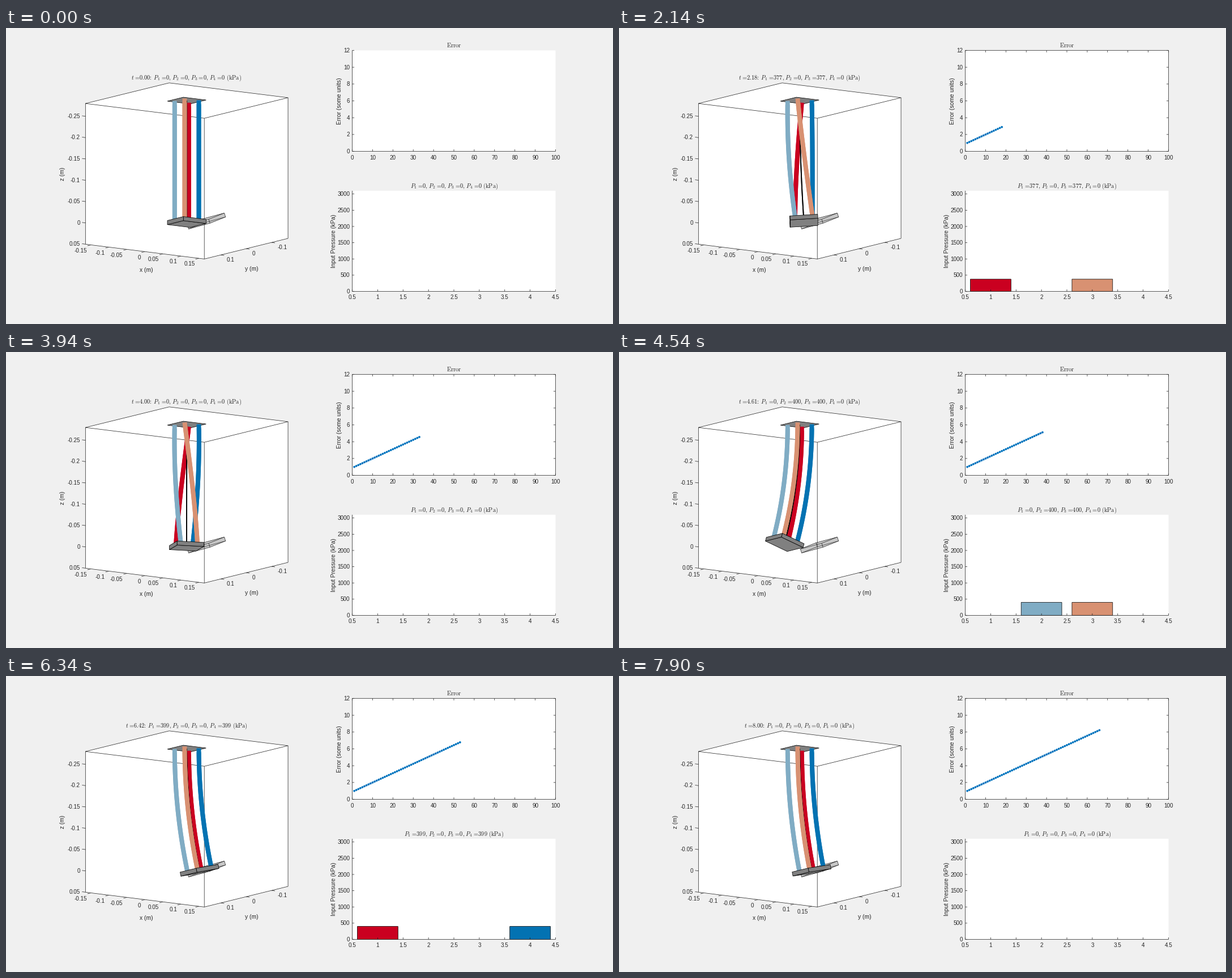
Recreate the animation shown at these times as a matplotlib script. Size 1072 by 522 pixels, loop 8000 ms.

```python
import numpy as np
import matplotlib.pyplot as plt
from matplotlib.animation import FuncAnimation
from matplotlib.collections import LineCollection, PolyCollection
from matplotlib.patches import Polygon, Rectangle

W, H, DPI = 1072, 522, 100
PX = 72 / DPI  # points per pixel
THIN = 0.75 * PX
INK = "#262626"
COLORS = ["#ca0020", "#80acc4", "#d89172", "#0372b2"]
STEPS, DURATION = 66, 8.0
TICK_SIZE, LABEL_SIZE, TITLE_SIZE = 9.9, 10.2, 10.45

plt.rcParams.update({"font.family": "Liberation Sans", "mathtext.fontset": "cm"})
fig = plt.figure(figsize=(W / DPI, H / DPI), dpi=DPI, facecolor="#f0f0f0")
ax = fig.add_axes([0, 0, 1, 1])
ax.set(xlim=(0, W), ylim=(H, 0))
ax.axis("off")


# ---- robot model -------------------------------------------------------

LENGTH, TUBE_R, PLATE_A, PLATE_H = 0.28, 0.0197, 0.0315, 0.0095
PAIRS = [(2, 3), (0, 2), (1, 2), (0, 3)]  # tubes inflated in each 2 s phase
SIGN_X = np.array([1, -1, -1, 1])
SIGN_Y = np.array([1, 1, -1, -1])
SIGN_TWIST = np.array([1, -1, 1, -1])
BEND, TWIST = 0.243, 1.69
# Bending is slow and swings past its goal, twisting is quick and well damped.
OMEGA = np.array([5.3, 5.3, 15])
ZETA = np.array([0.4, 0.4, 0.9])


def pressures(t):
    phase = min(int(t // 2), 3)
    edge = min(t - 2 * phase, 2 * phase + 2 - t)
    p = np.zeros(4)
    p[list(PAIRS[phase])] = 400 * (1 - np.exp(-edge / 0.064))
    return p


def simulate(substeps=40):
    """Damped response of (bend x, bend y, twist) to the pressures."""
    dt = DURATION / STEPS / substeps
    q, v = np.zeros(3), np.zeros(3)
    poses = [q.copy()]
    for i in range(1, STEPS * substeps + 1):
        p = pressures(i * dt) / 800
        goal = np.array([BEND * SIGN_X @ p, BEND * SIGN_Y @ p, TWIST * SIGN_TWIST @ p])
        v += dt * (OMEGA**2 * (goal - q) - 2 * ZETA * OMEGA * v)
        q += dt * v
        if i % substeps == 0:
            poses.append(q.copy())
    return poses


def section(pose, u):
    """Centre and rotation of the cross-section at fraction u of the length."""
    bx, by, twist = pose
    bend = max(np.hypot(bx, by), 1e-9)
    c, s = bx / bend, by / bend
    a = bend * u
    out = LENGTH * (1 - np.cos(a)) / bend
    centre = np.array([out * c, out * s, LENGTH * np.sin(a) / bend - LENGTH])
    k = np.array([[0, 0, c], [0, 0, s], [-c, -s, 0]])
    g = twist * u
    spin = np.array([[np.cos(g), -np.sin(g), 0], [np.sin(g), np.cos(g), 0], [0, 0, 1]])
    return centre, (np.eye(3) + np.sin(a) * k + (1 - np.cos(a)) * k @ k) @ spin


# ---- projection (orthographic, seen from slightly below) ---------------

VIEW = np.array([[636, -448, 0], [79, 110, 752]])
TOWARD = np.array([-0.567, -0.805, 0.174])
ORIGIN = np.array([319.2, 128 + 0.28 * 752])


def project(points):
    return np.asarray(points) @ VIEW.T + ORIGIN


CORNERS = [(-1, -1), (1, -1), (1, 1), (-1, 1)]
FACES = [(0, 1, 2, 3), (4, 5, 6, 7), (0, 1, 5, 4), (1, 2, 6, 5), (2, 3, 7, 6), (3, 0, 4, 7)]


def plate_faces(pose, see_through=False):
    base, rot = section(pose, 1)
    local = [(x * PLATE_A, y * PLATE_A, z) for z in (0, PLATE_H) for x, y in CORNERS]
    pts = base + np.array(local) @ rot.T
    middle = pts.mean(axis=0)
    faces = [pts[list(f)] for f in FACES]
    return [project(f) for f in faces
            if see_through or (f.mean(axis=0) - middle) @ TOWARD > 0]


def tube_segments(pose, n=30):
    """Short overlapping pieces of the tubes and backbone, far to near."""
    offsets = [(TUBE_R * x, TUBE_R * y, 0) for x, y in zip(SIGN_X, SIGN_Y)] + [(0, 0, 0)]
    sections = [section(pose, u) for u in np.linspace(0, 1, n + 1)]
    pieces = []
    for offset, color, width in zip(offsets, COLORS + ["black"], [7.9] * 4 + [1.8]):
        path = np.array([c + r @ np.array(offset) for c, r in sections])
        for i in range(n):
            part = path[i:i + 3]
            pieces.append((part.mean(axis=0) @ TOWARD, project(part), color, width * PX))
    pieces.sort(key=lambda p: p[0])
    return [list(col) for col in zip(*pieces)][1:]


# ---- static drawing ----------------------------------------------------

def label(x, y, s, size=TICK_SIZE, ha="center", **kw):
    return ax.text(x, y, s, fontsize=size * PX, ha=ha, color=INK, **kw)


def add(collection):
    collection.set_snap(False)
    ax.add_collection(collection, autolim=False)
    return collection


def lines(segments, z=2):
    return add(LineCollection(segments, colors=INK, linewidths=THIN, zorder=z))


def draw_space():
    m, top, low = 0.165, -0.28, 0.05
    back, right, front, left = project([(x * m, y * m, top) for x, y in CORNERS])
    down = np.array([0, (low - top) * VIEW[1, 2]])
    ax.add_patch(Polygon([back, right, right + down, front + down, left + down, left],
                         fc="white", ec="none", zorder=1))
    segs = [[left, back, right, front, left], [left, left + down], [front, front + down],
            [right, right + down], [left + down, front + down, right + down]]
    for v in np.arange(-3, 4) * 0.05:
        x, y = project((v, m, low))
        segs.append([(x, y), (x - 6, y + 1.5)])
        label(x - 7, y + 13.2, f"{v:.2g}", ha="right")
    for v in (0.1, 0, -0.1):
        x, y = project((m, v, low))
        segs.append([(x, y), (x + 6, y + 0.8)])
        label(x + 10.5, y + 11.5, f"{v:.2g}", ha="left")
    for v in np.arange(-5, 2) * 0.05:
        x, y = project((-m, m, v))
        segs.append([(x, y), (x - 6, y - 0.8)])
        label(x - 9.5, y + 3.2, f"{v:.2g}", ha="right")
    lines(segs)
    label(247.5, 430.5, "x (m)", LABEL_SIZE)
    label(433.5, 427.5, "y (m)", LABEL_SIZE)
    label(100, 257.5, "z (m)", LABEL_SIZE, rotation=90, va="center")


class Panel:
    """Plain 2D axes placed in pixel coordinates."""

    def __init__(self, top, bottom, xlim, ylim, xticks, yticks):
        self.x0, self.x1, self.top, self.bottom = 611.5, 970.5, top, bottom
        self.xlim, self.ylim = xlim, ylim
        self.xticks, self.yticks = xticks, yticks
        ax.add_patch(Rectangle((self.x0, top), self.x1 - self.x0, bottom - top,
                               fc="white", ec="none", zorder=1, snap=False))
        lines(self.edges(self.x0, bottom, 1), z=4)
        for v in xticks:
            label(self.x(v), bottom + 14, f"{v:g}")
        for v in yticks:
            label(self.x0 - 4, self.y(v) + 3.6, f"{v:g}", ha="right")

    def x(self, v):
        lo, hi = self.xlim
        return self.x0 + (v - lo) / (hi - lo) * (self.x1 - self.x0)

    def y(self, v):
        lo, hi = self.ylim
        return self.bottom - (v - lo) / (hi - lo) * (self.bottom - self.top)

    def edges(self, x, y, inward):
        """One horizontal and one vertical ruler meeting at (x, y)."""
        d = 3.5 * inward
        segs = [[(self.x0, y), (self.x1, y)], [(x, self.top), (x, self.bottom)]]
        segs += [[(self.x(v), y), (self.x(v), y - d)] for v in self.xticks]
        segs += [[(x, self.y(v)), (x + d, self.y(v))] for v in self.yticks]
        return segs


draw_space()
error = Panel(39.5, 217.5, (0, 100), (0, 12), range(0, 101, 10), range(0, 13, 2))
inputs = Panel(287, 464.5, (0.5, 4.5), (0, 3100), np.arange(0.5, 4.6, 0.5), range(0, 3001, 500))
label(588.5, 128.5, "Error (some units)", LABEL_SIZE, rotation=90, va="center")
label(578.5, 375.5, "Input Pressure (kPa)", LABEL_SIZE, rotation=90, va="center")
label(791, 34, r"$\mathrm{Error}$", TITLE_SIZE)

ceiling = project([(x * PLATE_A, y * PLATE_A, -LENGTH) for x, y in CORNERS])
ax.add_patch(Polygon(ceiling, fc="#808080", ec="black", lw=THIN, zorder=3))

goal_bend, goal_dir = 0.333, np.radians(-15)
goal_pose = (goal_bend * np.cos(goal_dir), goal_bend * np.sin(goal_dir), 0)
add(PolyCollection(plate_faces(goal_pose, see_through=True), facecolors=(0.5, 0.5, 0.5, 0.25),
                   edgecolors=(0, 0, 0, 0.6), linewidths=0.6 * PX, zorder=4))


# ---- moving parts ------------------------------------------------------

poses = simulate()
tubes = add(LineCollection([], capstyle="butt", zorder=5))
plate = add(PolyCollection([], facecolors="#808080", edgecolors="black",
                           linewidths=THIN, zorder=6))
frame_box = lines(error.edges(error.x1, error.top, -1), z=4)
dots = add(LineCollection([], colors="#0072bd", linewidths=3.9 * PX,
                          capstyle="round", zorder=5))
bars = [ax.add_patch(Rectangle((inputs.x(i + 0.6), inputs.bottom), inputs.x(0.8) - inputs.x(0), 0,
                               fc=c, ec="black", lw=THIN, zorder=3, snap=False))
        for i, c in enumerate(COLORS)]
space_title = label(318.8, 91.3, "", TITLE_SIZE)
input_title = label(791.3, 281.5, "", TITLE_SIZE)

EQUALS = r"\hspace{0.08}=\hspace{-0.2}"


def pressure_text(p):
    parts = [rf"P_{i}{EQUALS}\mathrm{{{v:.0f}}}" for i, v in enumerate(p, 1)]
    return r",\hspace{0.13}".join(parts) + r"\hspace{0.33}\mathrm{(kPa)}"


def update(frame):
    ms = frame * 20
    step = 0 if ms < 100 else (ms - 100) // 120 + 1
    t = DURATION * step / STEPS
    p = pressures(t)

    segments, colors, widths = tube_segments(poses[step])
    tubes.set_segments(segments)
    tubes.set_color(colors)
    tubes.set_linewidth(widths)
    plate.set_verts(plate_faces(poses[step]))

    # Round caps on tiny strokes place the dots without rounding to pixels.
    points = [(error.x(n), error.y(1 + (n - 1) / 9)) for n in range(1, step + 1)]
    dots.set_segments([[(x, y), (x + 0.01, y)] for x, y in points])
    frame_box.set_visible(step > 0)
    for bar, value in zip(bars, p):
        bar.set_height(inputs.y(value) - inputs.bottom)
        bar.set_visible(value > 0)

    text = pressure_text(p)
    clock = rf"t{EQUALS}\mathrm{{{t:.2f}}}\hspace{{-0.2}}:\hspace{{0.22}}"
    space_title.set_text(f"${clock}{text}$")
    input_title.set_text(f"${text}$")
    return tubes, plate, dots, frame_box, *bars, space_title, input_title


anim = FuncAnimation(fig, update, frames=400, interval=20, repeat=True, cache_frame_data=False)
plt.show()
```
